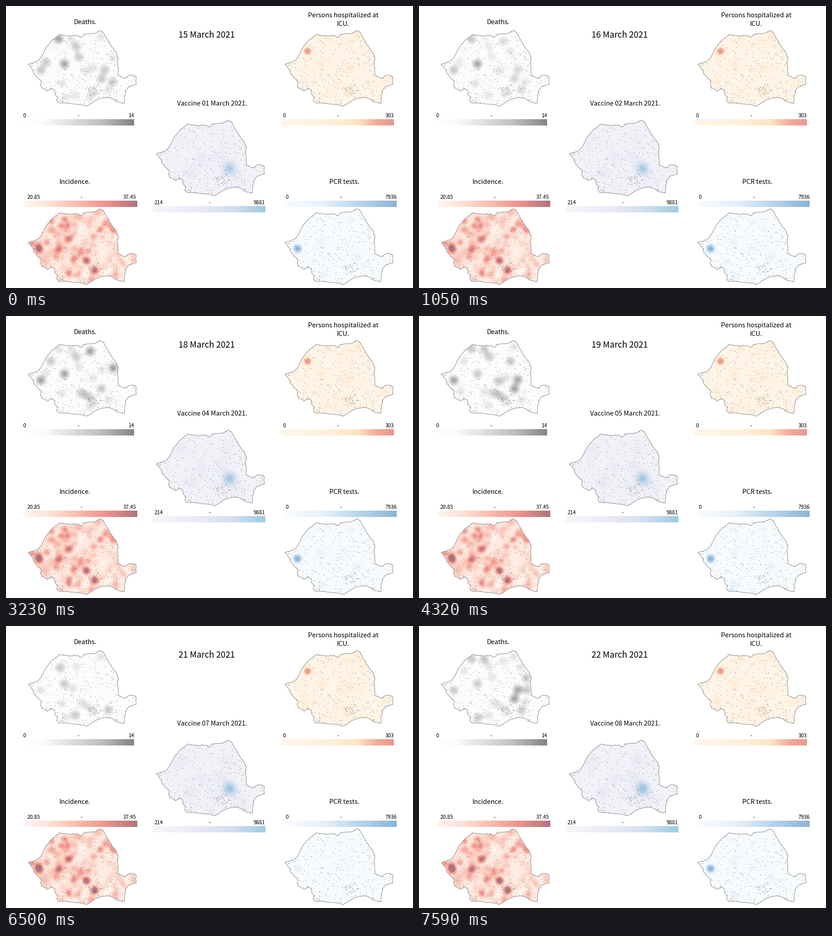
Animation of 899 by 623 pixels, one loop 8000 ms. Source, as a matplotlib script:

```python
import numpy as np
import matplotlib.pyplot as plt
from matplotlib.animation import FuncAnimation
from matplotlib.path import Path

W, H, DPI = 899, 623, 64
STEP, LOOP = 40, 8000
FIRST, HOLD, DAYS = 1050, 1090, 8
plt.rcParams["font.family"] = ["Noto Sans CJK JP", "Liberation Sans"]
rng = np.random.default_rng(21)

# Key points of the border, clockwise from the western tip
BORDER = [
    (49, 128), (62, 125), (73, 119), (79, 111), (86, 96), (93, 86), (103, 75),
    (111, 69), (118, 63), (131, 65), (144, 66), (158, 65), (165, 70), (173, 63),
    (187, 61), (196, 61), (208, 54), (215, 58), (222, 71), (231, 86), (236, 94),
    (244, 103), (248, 115), (246, 127), (248, 144), (248, 153), (262, 160),
    (272, 153), (281, 153), (287, 157), (287, 173), (271, 178), (265, 187),
    (262, 198), (261, 215), (250, 213), (244, 211), (236, 205), (226, 202),
    (210, 204), (194, 211), (178, 221), (164, 217), (149, 217), (131, 214),
    (117, 214), (112, 209), (114, 202), (108, 195), (107, 186), (101, 182),
    (92, 188), (79, 181), (76, 174), (78, 166), (69, 158), (61, 149), (59, 140),
]

SITE = dict(
    SM=(116, 73), MM=(144, 74), BN=(155, 90), MS=(161, 113), BH=(99, 100),
    AR=(88, 124), TM=(77, 142), CS=(92, 166), CJ=(129, 128), SJ=(120, 92),
    GJ=(124, 171), DJ=(131, 202), OT=(153, 197), VL=(145, 168), AG=(166, 170),
    DB=(181, 177), SB=(148, 138), BV=(176, 144), CV=(193, 137), SV=(186, 78),
    BT=(209, 68), IS=(224, 92), NT=(202, 100), BC=(212, 119), VS=(237, 115),
    VN=(218, 141), GL=(238, 141), BZ=(211, 161), BR=(236, 167), IF=(194, 189),
    GR=(185, 202), IL=(226, 186), TL=(266, 167), CT=(252, 197),
)

# Counties with many, some and few deaths; missing days lie in between
DEATHS = {
    0: ("SM CJ", "BN MS AR TM VN BZ BR", "MM GJ DJ OT BV CV IL VS BT IF GR"),
    2: ("SV CJ", "TM NT IL", "BC BV BZ VN GL TL BH GJ OT IF SM"),
    3: ("VS CJ TM SV", "BH BN AG DB BZ", "MM SM MS AR BC CV IF GR IL GJ"),
    4: ("TM VN BZ", "SM BN MM NT CJ BV AG DB", "BT BH CV VL OT IL IF CS"),
    6: ("", "SJ OT IL CJ", "BN TM AG DB DJ IF SB BT GJ"),
    7: ("VN BZ", "SM MM CJ GL IL VS DJ TM", "BN SV MS BT IS BR AG DB OT IF BH"),
}
LEVELS = (.74, .5, .28)

HOT = [(73, 145), (72, 137), (139, 121), (117, 143), (179, 170), (196, 190)]
WARM = [(58, 131), (101, 81), (129, 77), (122, 91), (136, 90), (148, 167),
        (138, 196), (182, 147), (208, 100), (230, 92), (110, 160), (90, 128)]

# Colour ramps: level, then red, green, blue
GREYS = [(0, 254, 254, 254), (.2, 250, 250, 250), (.45, 221, 221, 221),
         (.7, 191, 191, 191), (1, 131, 131, 131)]
ORANGES = [(0, 255, 245, 233), (.45, 255, 239, 218), (.68, 254, 227, 193),
           (.85, 242, 170, 152), (1, 236, 149, 144)]
VIOLETS = [(0, 246, 245, 250), (.4, 233, 234, 245), (.7, 211, 222, 239),
           (1, 158, 203, 226)]
REDS = [(0, 255, 244, 238), (.2, 254, 228, 217), (.5, 248, 182, 168),
        (.72, 240, 146, 141), (1, 172, 116, 125)]
BLUES = [(0, 249, 252, 255), (.35, 229, 240, 249), (.7, 180, 209, 234),
         (1, 137, 179, 215)]

X0, X1, Y0, Y1 = 47, 291, 52, 224
gx, gy = np.meshgrid(np.arange(X0, X1) + .5, np.arange(Y0, Y1) + .5)


def shade(values, ramp):
    s = np.array(ramp)
    v = np.clip(values, 0, 1)
    rgb = [np.interp(v, s[:, 0], s[:, c]) for c in (1, 2, 3)]
    return np.stack(rgb, -1).round().astype(np.uint8)


def heat(points, level, radius):
    """Sum of quartic bumps."""
    field = np.zeros(gx.shape)
    for x, y in points:
        d2 = ((gx - x) ** 2 + (gy - y) ** 2) / radius ** 2
        field += level * np.clip(1 - d2, 0, 1) ** 2
    return field


def at(codes, level, radius):
    return heat([SITE[c] for c in codes.split()], level, radius)


def rough(points, parts=5):
    p = np.array(points + points[:1], float)
    t = np.arange((len(p) - 1) * parts) / parts
    line = np.c_[np.interp(t, range(len(p)), p[:, 0]),
                 np.interp(t, range(len(p)), p[:, 1])]
    line += rng.normal(0, .45, line.shape)
    return np.vstack([line, line[:1]])


border = rough(BORDER)
shape = Path(border)
inside = shape.contains_points(np.c_[gx.ravel(), gy.ravel()]).reshape(gx.shape)


def scatter(n):
    pts = rng.uniform((49, 54), (288, 221), (n, 2))
    return pts[shape.contains_points(pts)]


dots = np.vstack([scatter(430), rng.normal((193, 188), (9, 10), (40, 2))])
dots = dots[shape.contains_points(dots)]
mottle = heat(scatter(170), .17, 13) - heat(scatter(60), .1, 16)


def deaths(day):
    near = [day] if day in DEATHS else [day - 1, day + 1]
    return .1 + sum(at(codes, level, 18) / len(near) for d in near
                    for codes, level in zip(DEATHS[d], LEVELS))


def hospital(day):
    return (.1 + at("BH", .9, 18) + at("CJ CV BT IF", .48, 16)
            + at("SV MM TL CS", .3 + .02 * day, 15)
            + at("BV AG OT IS DJ VN", .15 + .015 * day, 15))


def vaccine(day):
    return (.14 + at("BZ", .78 + .02 * day, 27) + at("SB CV GJ", .25, 24)
            + at("BH DB NT IL", .1 + .015 * day, 28))


def incidence(day):
    west = np.interp(gx, (50, 288), (.24, .08))
    flare = .4 * np.exp(-((day - 2.5) / 1.3) ** 2)
    return (west + mottle + heat(HOT, .62 + .02 * day, 14)
            + heat([HOT[-1]], .3, 17) + heat(WARM, .4, 11)
            + heat([(140, 186)], flare, 11))


def tests(day):
    sunday = day % 7 == 6
    return (.03 + at("TM", .3 if sunday else .98, 16)
            + at("CJ DJ BZ", .06 if sunday else .2, 18)
            + at("SM CV SV", .06, 18))


# field, ramp, map offset, colour bar corner
PANELS = [
    (deaths, GREYS, (0, 0), (34, 250)),
    (hospital, ORANGES, (567, 0), (608, 250)),
    (vaccine, VIOLETS, (283, 198), (324, 442)),
    (incidence, REDS, (0, 394), (41, 430)),
    (tests, BLUES, (567, 394), (614, 430)),
]


def paint(day):
    img = np.full((H, W, 3), 255, np.uint8)
    for field, ramp, (ox, oy), (bx, by) in PANELS:
        img[by:by + 14, bx:bx + 249] = shade(np.linspace(0, 1, 249), ramp)
        area = img[Y0 + oy:Y1 + oy, X0 + ox:X1 + ox]
        area[inside] = shade(field(day), ramp)[inside]
    return img


pages = [paint(d) for d in range(DAYS)]

fig = plt.figure(figsize=(W / DPI, H / DPI), dpi=DPI, facecolor="white")
ax = fig.add_axes([0, 0, 1, 1])
picture = ax.imshow(pages[0], extent=(0, W, H, 0), interpolation="nearest",
                    aspect="auto")
ax.set(xlim=(0, W), ylim=(H, 0))
ax.axis("off")


def label(x, y, text, px):
    return ax.text(x, y, text, fontsize=px * 72 / DPI, color="black",
                   ha="center", va="baseline")


SCALES = [("0", "14"), ("0", "303"), ("214", "9881"), ("20.85", "37.45"),
          ("0", "7936")]
for (_, _, (ox, oy), (bx, by)), (low, high) in zip(PANELS, SCALES):
    ax.plot(dots[:, 0] + ox, dots[:, 1] + oy, ",", color="#4c4c4c")
    ax.plot(border[:, 0] + ox, border[:, 1] + oy, color="#686868", lw=.9)
    label(bx + 3 + 3.4 * len(low), by - 3.5, low, 11.6)
    label(bx + 125, by - 3.5, "-", 11.6)
    label(bx + 249 - 3.3 * len(high), by - 3.5, high, 11.6)

for x, y, text in [(174.5, 39.5, "Deaths."), (744.5, 24.5, "Persons hospitalized at"),
                   (744.5, 44, "ICU."), (152, 393, "Incidence."),
                   (747, 393, "PCR tests.")]:
    label(x, y, text, 14.3)
date = label(443, 70, "", 18.7)
dose = label(455, 219.5, "", 14.3)


def update(i):
    day = max(0, int(np.ceil(((i + 1) * STEP - FIRST) / HOLD)))
    picture.set_data(pages[day])
    date.set_text(f"{15 + day} March 2021")
    dose.set_text(f"Vaccine {1 + day:02d} March 2021.")
    return picture, date, dose


anim = FuncAnimation(fig, update, frames=LOOP // STEP, interval=STEP,
                     init_func=lambda: update(0), repeat=True, repeat_delay=0)
plt.show()
```
